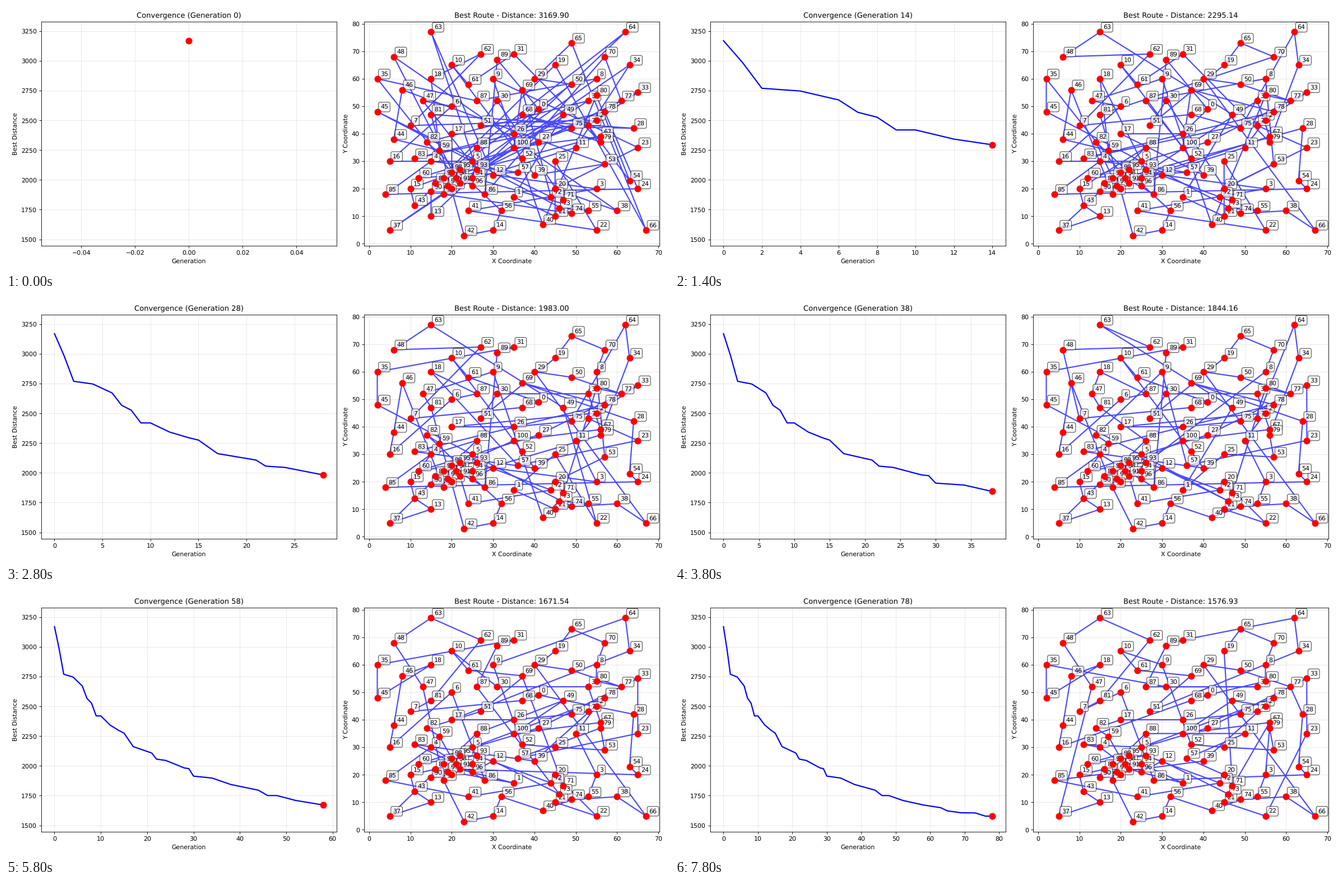
These frames come from a looping animation (1183x473 px, 8000 ms). A matplotlib script:

```python
import random

import numpy as np
import matplotlib.pyplot as plt
from matplotlib.animation import FuncAnimation

W, H, DPI = 1183, 473, 1183 / 15
FRAMES, STEP = 40, 2          # two generations per frame
LAST = STEP * (FRAMES - 1)

XS = [41, 35, 55, 55, 15, 25, 20, 10, 55, 30, 20, 50, 30, 15, 30, 10, 5, 20, 15, 45,
      45, 45, 55, 65, 65, 45, 35, 41, 64, 40, 31, 35, 53, 65, 63, 2, 20, 5, 60, 40,
      42, 24, 23, 11, 6, 2, 8, 13, 6, 47, 49, 27, 37, 57, 63, 53, 32, 36, 21, 17,
      12, 24, 27, 15, 62, 49, 67, 56, 37, 37, 57, 47, 44, 46, 49, 49, 53, 61, 57, 56,
      55, 15, 14, 11, 16, 4, 28, 26, 26, 31, 15, 22, 18, 26, 25, 22, 25, 19, 20, 18, 35]
YS = [49, 17, 45, 20, 30, 30, 50, 43, 60, 60, 65, 35, 25, 10, 5, 20, 30, 40, 60, 65,
      20, 10, 5, 35, 20, 30, 40, 37, 42, 60, 52, 69, 52, 55, 65, 60, 20, 5, 12, 25,
      7, 12, 3, 14, 38, 48, 56, 52, 68, 47, 58, 43, 31, 29, 23, 12, 12, 26, 24, 34,
      24, 58, 69, 77, 77, 73, 5, 39, 47, 56, 68, 16, 17, 13, 11, 42, 43, 52, 48, 37,
      54, 47, 37, 31, 22, 18, 18, 52, 35, 67, 19, 22, 24, 27, 24, 27, 21, 21, 26, 18, 35]
CITIES = np.column_stack([XS, YS]).astype(float)

# Stretches of the finished route; the search joins them up.
STRETCHES = [
    [84, 15, 43, 13, 37, 47, 48, 63, 62, 81, 7], [32, 30, 35, 45, 18, 46, 44, 16, 68, 0],
    [10, 61, 69], [89, 31, 64, 34, 51], [8, 70, 65, 19, 71], [9, 52, 25, 53, 79],
    [29, 66, 38, 74, 40, 56], [39, 85, 41, 72], [54, 28, 77, 50],
    [17, 26, 75, 76, 2, 49, 100], [33, 23, 22],
]

# Corners of the convergence curve: generation, distance.
CORNERS = [
    (0, 3169.90), (1, 2985), (2, 2770), (4, 2747), (6, 2672), (7, 2568), (8, 2527),
    (9, 2420), (10, 2420), (12, 2343), (14, 2295.14), (15, 2276), (17, 2162), (21, 2108),
    (22, 2056.86), (24, 2046), (28, 1983), (29, 1977), (30, 1914), (34, 1898),
    (38, 1844.16), (44, 1796), (46, 1750.72), (48, 1750.72), (52, 1710), (58, 1671.54),
    (63, 1649), (65, 1622), (69, 1606), (73, 1605), (76, 1578), (78, 1576.93),
]
BEST = np.interp(np.arange(LAST + 1), *zip(*CORNERS))


def length(tour):
    path = CITIES[tour + tour[:1]]
    return np.hypot(*np.diff(path, axis=0).T).sum()


def finished_tour(rng, goal):
    """Join the stretches by random reversals until the tour is short enough."""
    used = {c for s in STRETCHES for c in s}
    blocks = STRETCHES + [[c] for c in range(len(CITIES)) if c not in used]
    rng.shuffle(blocks)
    tour = sum(blocks, [])
    best = length(tour)
    for _ in range(15000):
        if best <= goal:
            break
        i, j = sorted(rng.sample(range(len(blocks) + 1), 2))
        trial = blocks[:i] + [b[::-1] for b in blocks[i:j][::-1]] + blocks[j:]
        flat = [c for b in trial for c in b]
        dist = length(flat)
        if dist < best:
            blocks, tour, best = trial, flat, dist
    return tour


def lengthen(rng, tour, goal):
    """Undo the search: reverse random spans until the tour is about as long as goal."""
    dist = length(tour)
    for _ in range(300):
        if goal - dist < 4:
            break
        i, j = sorted(rng.sample(range(len(tour) + 1), 2))
        trial = tour[:i] + tour[i:j][::-1] + tour[j:]
        new = length(trial)
        if (dist + goal) / 2 < new <= goal:
            tour, dist = trial, new
    return tour


def all_tours():
    rng = random.Random(8)
    tours = [finished_tour(rng, BEST[-1])]
    for gen in range(LAST - 1, -1, -1):
        tours.append(lengthen(rng, tours[-1], BEST[gen]))
    return tours[::-1]


TOURS = all_tours()

plt.rcParams["text.hinting"] = "none"
fig, (left, right) = plt.subplots(1, 2, figsize=((W + 0.01) / DPI, (H + 0.01) / DPI), dpi=DPI)

curve, = left.plot([], [], "b-", lw=2)
head = left.scatter([0], [BEST[0]], c="red", s=100, zorder=5)
left.set(xlabel="Generation", ylabel="Best Distance", ylim=(1447, BEST[0] * 1.05))

route, = right.plot([], [], "b-", lw=2, alpha=0.7)
right.scatter(XS, YS, c="red", s=100, zorder=5)
right.set(xlabel="X Coordinate", ylabel="Y Coordinate", xlim=(-1.25, 70.25), ylim=(-0.7, 80.7))
for i, city in enumerate(CITIES):
    tag = right.annotate(str(i), city, xytext=(5, 5), textcoords="offset points", fontsize=10,
                         bbox=dict(boxstyle="round,pad=0.3", facecolor="white", alpha=0.7))
    tag.set_in_layout(False)

for ax in (left, right):
    ax.grid(True, alpha=0.3)


def update(k):
    gen = STEP * k
    curve.set_data(np.arange(gen + 1), BEST[:gen + 1])
    head.set_offsets([(gen, BEST[gen])])
    margin = 0.05 * gen if gen else 0.055
    left.set_xlim(-margin, gen + margin)
    left.set_title(f"Convergence (Generation {gen})")
    tour = TOURS[gen]
    route.set_data(*CITIES[tour + tour[:1]].T)
    right.set_title(f"Best Route - Distance: {BEST[gen]:.2f}")
    fig.tight_layout()
    return curve, head, route


anim = FuncAnimation(fig, update, frames=FRAMES, init_func=lambda: update(0),
                     interval=200, repeat=True, cache_frame_data=False)
plt.show()
```
